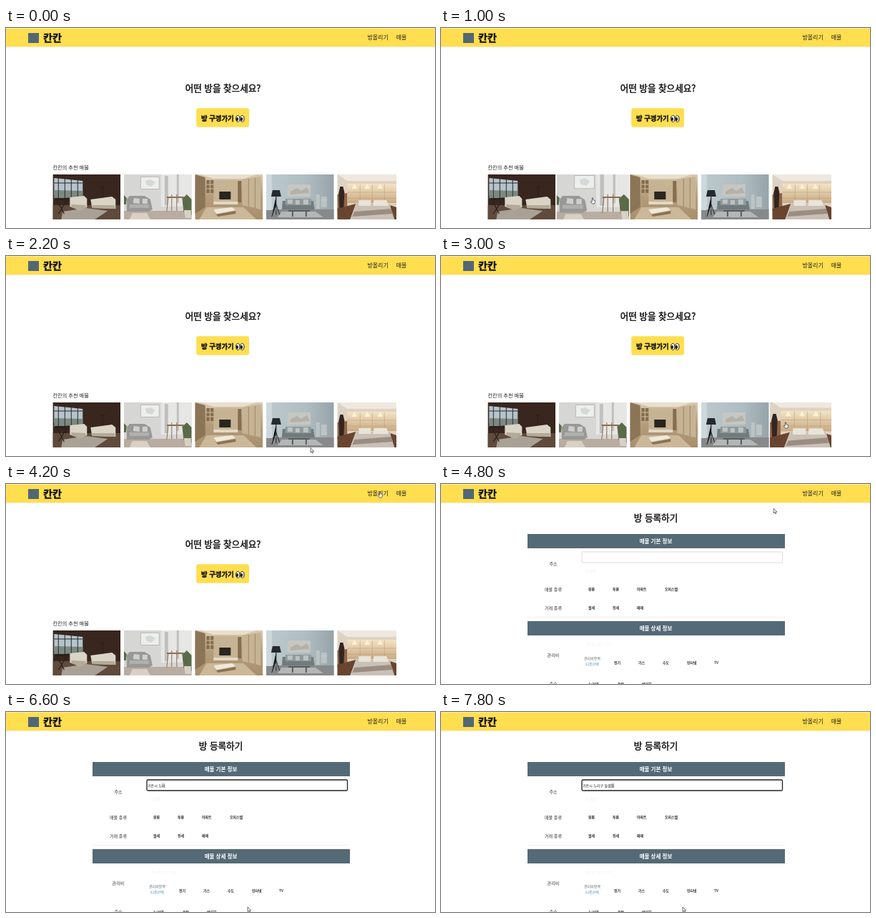
Animation of 600 by 280 pixels, one loop 8000 ms. Source, as an HTML page:

```html
<!DOCTYPE html>
<html lang="ko">
<head>
<meta charset="utf-8">
<title>방 찾기</title>
<style>
  html, body { margin: 0; width: 100%; height: 100%; overflow: hidden; background: #fff; }
  svg { display: block; width: 600px; height: 280px; }
  text { font-family: "Noto Sans CJK KR", "Noto Sans CJK", sans-serif; white-space: pre; }
</style>
</head>
<body>
<svg viewBox="0 0 600 280">
  <defs>
    <clipPath id="strip"><rect x="65.3" y="205" width="480.7" height="63"/></clipPath>
    <clipPath id="card"><rect width="94.8" height="63"/></clipPath>
    <linearGradient id="warm" x2="0" y2="1">
      <stop stop-color="#d9cbb2"/><stop offset=".5" stop-color="#b39c7b"/><stop offset="1" stop-color="#a88f6c"/>
    </linearGradient>
    <linearGradient id="cool" x2="1" y2="0">
      <stop stop-color="#bccace"/><stop offset=".6" stop-color="#afbcc1"/><stop offset="1" stop-color="#96a4aa"/>
    </linearGradient>
    <linearGradient id="lit" x2="0" y2="1">
      <stop stop-color="#f3e3c4"/><stop offset="1" stop-color="#c9ab84"/>
    </linearGradient>

    <g id="loft">
      <path fill="#38261f" d="M0 0h95v63H0z"/>
      <path fill="#5f4a3c" d="M0 43h95v20H0z"/>
      <path fill="#b5c3cb" d="M2 5l40 4v20H2z"/>
      <path fill="#7c8982" d="M2 22l40 1v8L2 34z"/>
      <path stroke="#2b2828" d="M8 3v34M17 3v34M26 3v32M35 3v30M2 12h40"/>
      <path fill="#a9a196" d="M14 52l33-5 30 4-18 12H12z"/>
      <path fill="#d9d4c6" d="M24 32l20-2 4 4v12l-11 4-13-5zM53 35l30-4 5 4v13l-33-1z"/>
      <path fill="#b4aa98" d="M26 42l20 1v4l-10 3-10-5zM54 43h33v5l-32-1z"/>
      <path fill="#2b211d" d="M3 33h20v3H3z"/>
      <path stroke="#2b211d" stroke-width="1.300" d="M6 36l10 19M20 36L8 55M70 32V18M67 18h6"/>
    </g>

    <g id="white">
      <path fill="#d6d6d4" d="M0 0h95v63H0z"/>
      <path fill="#b9aca0" d="M0 51h95v12H0z"/>
      <path fill="#e6e6e4" d="M52 0h43v45H52z"/>
      <path fill="#eeeeec" stroke="#bcbab7" d="M23.500 3.500h26v17h-26z"/>
      <path fill="#d3d8d9" d="M30 9l7-2 7 4-5 6-7-2z"/>
      <path fill="#bfc0bf" d="M57 2h5v41h-5zM74 0h3v40h-3z"/>
      <path fill="#989997" d="M4 35l4-5h21l8 5 3 14-5 3H4z"/>
      <path fill="#b0b0ae" d="M8 42h27v5H8z"/>
      <path fill="#d0cfca" d="M14 33l8 1v7l-9-1zM26 34h7v7h-7z"/>
      <path fill="#8d6f51" d="M60 31h24v2H60z"/>
      <path stroke="#8d6f51" d="M62 33l-2 19M82 33l2 20M67 28v23M74 28v23"/>
      <path fill="#596b48" d="M82 34l6-6 7 7v22l-11-6zM0 29l4 4-1 9H0z"/>
      <path fill="#d9d0c5" d="M12 54h20l5 9H8zM84 50h10v11H86z"/>
    </g>

    <g id="tan">
      <path fill="url(#warm)" d="M0 0h95v63H0z"/>
      <path fill="#e9dfcd" d="M8 0h78L68 6H26z"/>
      <path fill="#8c7557" d="M0 0l14 4v42L0 55z"/>
      <path fill="#c6b394" d="M26 8h34v31H26zM66 7l26-4v46l-26-6z"/>
      <path fill="#856d4e" d="M16 8h10v18H16zM60 9h5v30h-5z"/>
      <path stroke="#d2c1a3" d="M16 14h10M16 20h10M21 8v18"/>
      <path stroke="#927a5a" stroke-width=".8" d="M75 6v39M84 5v42M14 5v41"/>
      <path fill="#29251f" d="M34 24h16v11H34z"/>
      <path fill="#e3d8c5" d="M26 38h34v4H26z"/>
      <path fill="#cbb899" d="M16 46h52l18 17H6z"/>
      <path fill="#f0e9dc" d="M26 49l26-3 5 4-27 5z"/>
      <path fill="#8a7253" d="M27 53l3 3 27-5v4l-25 4z"/>
    </g>

    <g id="blue">
      <path fill="url(#cool)" d="M0 0h95v63H0z"/>
      <path fill="#87898a" d="M0 49h95v14H0z"/>
      <path fill="#cdd8dc" d="M0 0h8v50H0z"/>
      <path fill="#c6c7c2" d="M30 14h32v17H30z"/>
      <path fill="#b3b1a8" d="M34 24l9-5 6 4 8-5 4 8-27 2z"/>
      <path fill="#252a2d" d="M9 22h10l2 9H7z"/>
      <path stroke="#252a2d" d="M14 30v12l-6 17M14 42l6 17M14 42v15"/>
      <path fill="#717b7d" d="M23 37h43l2 12H22z"/>
      <path fill="#8f999a" d="M27 34h36v9H27z"/>
      <path fill="#bdc2c0" d="M30 35h7v6h-7zM41 36h6v6h-6zM52 35h7v7h-7z"/>
      <path fill="#bcc3c4" d="M70 28h5v20h-5zM77 31h8v15h-8z"/>
      <path fill="#b5b7b6" d="M22 52h47l11 8H16z"/>
      <path fill="#555b5c" d="M31 50h30v2H31zM36 52h2v7h-2zM55 52h2v7h-2z"/>
    </g>

    <g id="bedroom">
      <path fill="#ddd2c3" d="M0 0h95v63H0z"/>
      <path fill="#eee8df" d="M0 0h95L82 9H14z"/>
      <path fill="#8d6647" d="M0 28l14-2v20L0 52zM84 27l11 2v22l-11-4z"/>
      <path fill="url(#lit)" d="M14 13h70v27H14z"/>
      <path stroke="#b89770" stroke-width=".5" d="M14 25h70M14 33h70M32 14v25M49 14v25M66 14v25"/>
      <path fill="#fff1d3" d="M24 13l4 7h-8zM42 13l4 7h-8zM60 13l4 7h-8z"/>
      <path fill="#34251f" d="M4 17h4l2 8-1 23H3l-1-22z"/>
      <path fill="#69452f" d="M0 48l26-7-8 22H0zM74 43l21 7v13H78z"/>
      <path fill="#c9c0b6" d="M27 41h46l7 22H18z"/>
      <path fill="#e9e3da" d="M30 36h17v8H30zM51 36h18l3 8H50z"/>
      <path fill="#9c8d82" d="M24 52l51-4 3 7-57 4z"/>
    </g>
  </defs>

  <rect y=".5" width="600" height="25.500" fill="#ffde4f"/>
  <rect y="26" width="600" height="1" fill="#f7efcf"/>
  <rect x="31" y="7" width="15" height="14" fill="#526775"/>
  <g id="header"></g>

  <g id="home">
    <rect x="266.200" y="112.300" width="73.800" height="26.400" rx="3" fill="#ffde4f"/>
    <g fill="#fff" stroke="#222" stroke-width="1">
      <ellipse cx="324.300" cy="127" rx="2.600" ry="4.500"/><ellipse cx="330.400" cy="127" rx="2.600" ry="4.500"/>
    </g>
    <g fill="#222"><ellipse cx="323.400" cy="127.600" rx="1.600" ry="2.600"/><ellipse cx="329.500" cy="127.600" rx="1.600" ry="2.600"/></g>
    <g id="cards" clip-path="url(#strip)"></g>
  </g>

  <g id="form">
    <path fill="#546a76" d="M121 70h360v20H121zM121 192h360v20H121z"/>
    <path stroke="#e6e8e9" stroke-width=".7" d="M121 186.500h360"/>
    <rect id="field" x="197" y="95" width="280.500" height="15" rx="1.500" fill="#fff"/>
    <rect id="composing" y="99.500" width="4.800" height="7" fill="#d9dcdd"/>
    <text id="address" x="198" y="105" font-size="5" fill="#222"></text>
  </g>

  <g id="cursor" stroke="#333" stroke-width=".7" stroke-linejoin="round" fill="#fff">
    <path id="arrow" d="M0 0v6.500l1.500-1.300 1 2.300 1.100-.5-1-2.200h2z"/>
    <path id="hand" d="M-.7 0h1.400v2.700l2.700.8v2.300L2.600 8h-3.400L-2.600 5l.7-.7 1.200.8z"/>
  </g>
</svg>
<script>
const LOOP = 8000, STEP = 200, FORM_AT = 4400, FOCUS_AT = 5200, TYPE_AT = 5400, KEY_MS = 100;
const $ = id => document.getElementById(id);

function add(parent, tag, attrs, content = '') {
  const el = document.createElementNS('http://www.w3.org/2000/svg', tag);
  for (const key in attrs) el.setAttribute(key, attrs[key]);
  el.textContent = content;
  return parent.appendChild(el);
}

// y is the vertical middle of the line; heavy thickens the strokes by that many pixels
function label(parent, content, x, y, size, { weight = 400, fill = '#222', anchor = 'start', heavy = 0 } = {}) {
  add($(parent), 'text', {
    x, y: y + size * .37, 'font-size': size, 'font-weight': weight, fill,
    'text-anchor': anchor, stroke: fill, 'stroke-width': heavy
  }, content);
}

label('header', '칸칸', 52, 14, 14.1, { weight: 900, fill: '#111', heavy: .4 });
label('header', '방올리기', 505.4, 13.3, 8);
label('header', '매물', 545.7, 13.3, 8);

label('home', '어떤 방을 찾으세요?', 303.5, 84.5, 12.6, { fill: '#111', anchor: 'middle', heavy: .45 });
label('home', '방 구경가기', 272.9, 126.2, 9.4, { weight: 700, fill: '#111', heavy: .35 });
label('home', '칸칸의 추천 매물', 65.5, 195.3, 7.2);

const cards = ['loft', 'white', 'tan', 'blue', 'bedroom'].map((photo, i) => {
  const el = add($('cards'), 'g', { 'clip-path': 'url(#card)' });
  add(el, 'use', { href: '#' + photo });
  return { el, x: 65.3 + 99.5 * i };
});

label('form', '방 등록하기', 300.5, 47, 12.6, { fill: '#111', anchor: 'middle', heavy: .45 });
for (const [title, y] of [['매물 기본 정보', 80], ['매물 상세 정보', 202]])
  label('form', title, 300.5, y, 7.5, { weight: 700, fill: '#fff', anchor: 'middle' });
for (const [name, y] of [['주소', 112], ['매물 종류', 147.5], ['거래 종류', 173.5], ['관리비', 239.5], ['층수', 280]])
  label('form', name, 157, y, 6.1, { fill: '#333', anchor: 'middle' });

function options(y, names, start, pitch = 34) {
  names.forEach((name, i) => label('form', name, start + pitch * i, y, 4.9, { heavy: .15 }));
}
options(147.5, ['원룸', '투룸', '아파트'], 206);
options(147.5, ['오피스텔'], 313);
options(173.5, ['월세', '전세', '매매'], 206);
options(250.5, ['전기', '가스', '수도', '인터넷'], 242);
options(250.5, ['TV'], 382);
options(280, ['1~10층'], 206);
options(280, ['옥탑', '반지하'], 247);
label('form', '관리비항목', 211.5, 244.5, 5, { fill: '#546a76', anchor: 'middle' });
label('form', '(다중선택)', 211.5, 252.5, 4.6, { fill: '#5b8fb0', anchor: 'middle' });
label('form', '도로명', 203, 122, 4.8, { fill: '#ececec' });
label('form', '관리비 없음 있음', 203, 224.5, 5, { fill: '#f2f2f2' });

// Every state an input method shows while a Korean phrase is typed
function typingStates(phrase) {
  const leads = 'ㄱㄲㄴㄷㄸㄹㅁㅂㅃㅅㅆㅇㅈㅉㅊㅋㅌㅍㅎ';
  const states = [''];
  let done = '';
  for (const char of phrase) {
    const code = char.charCodeAt(0) - 0xAC00;
    if (code >= 0) {
      states.push(done + leads[Math.floor(code / 588)]);
      if (code % 28) states.push(done + String.fromCharCode(0xAC00 + code - code % 28));
    }
    done += char;
    states.push(done);
  }
  return states;
}
const states = typingStates('가온시 누리구 들샘길');

// time, x, y of the pointer tip
const path = [
  [200, 96, 261], [600, 112, 240], [1000, 212, 238], [1600, 331, 233], [2200, 426, 268.5],
  [3000, 482, 233], [3600, 500, 60], [4000, 523, 11], [4600, 523, 11],
  [5200, 300, 101], [5600, 338, 273], [LOOP, 338, 273]
];

function pointerAt(t) {
  const i = Math.max(1, path.findIndex(p => p[0] >= t));
  const [t0, x0, y0] = path[i - 1], [t1, x1, y1] = path[i];
  const u = Math.max(0, (t - t0) / (t1 - t0)), k = u * u * (3 - 2 * u);
  return [x0 + (x1 - x0) * k, y0 + (y1 - y0) * k];
}

const show = (id, visible) => $(id).setAttribute('display', visible ? 'inline' : 'none');

function render(t) {
  const onForm = t >= FORM_AT, visible = t >= 200;
  const [px, py] = pointerAt(t);
  show('home', !onForm);
  show('form', onForm);

  let overLink = px > 503 && px < 562 && py > 6 && py < 21;
  for (const { el, x } of cards) {
    const hover = visible && !onForm && px >= x && px <= x + 94.8 && py >= 205 && py <= 268;
    overLink ||= hover;
    el.setAttribute('transform', `translate(${x + 47.4} 236.5) scale(${hover ? 1.07 : 1}) translate(-47.4 -31.5)`);
  }

  const focused = t >= FOCUS_AT;
  $('field').setAttribute('stroke', focused ? '#222' : '#ccc');
  $('field').setAttribute('stroke-width', focused ? 1.3 : .7);
  const keys = Math.max(0, Math.floor((t - TYPE_AT) / KEY_MS));
  const typed = states[Math.min(keys, states.length - 1)];
  $('address').textContent = typed;
  const composing = onForm && typed !== '' && !typed.endsWith(' ');
  show('composing', composing);
  if (composing) $('composing').setAttribute('x', 198 + $('address').getComputedTextLength() - 4.7);

  show('cursor', visible);
  show('hand', overLink);
  show('arrow', !overLink);
  $('cursor').setAttribute('transform', `translate(${px} ${py})`);
}

function tick() {
  render(Math.floor(performance.now() % LOOP / STEP) * STEP);
  requestAnimationFrame(tick);
}
tick();
</script>
</body>
</html>
```
